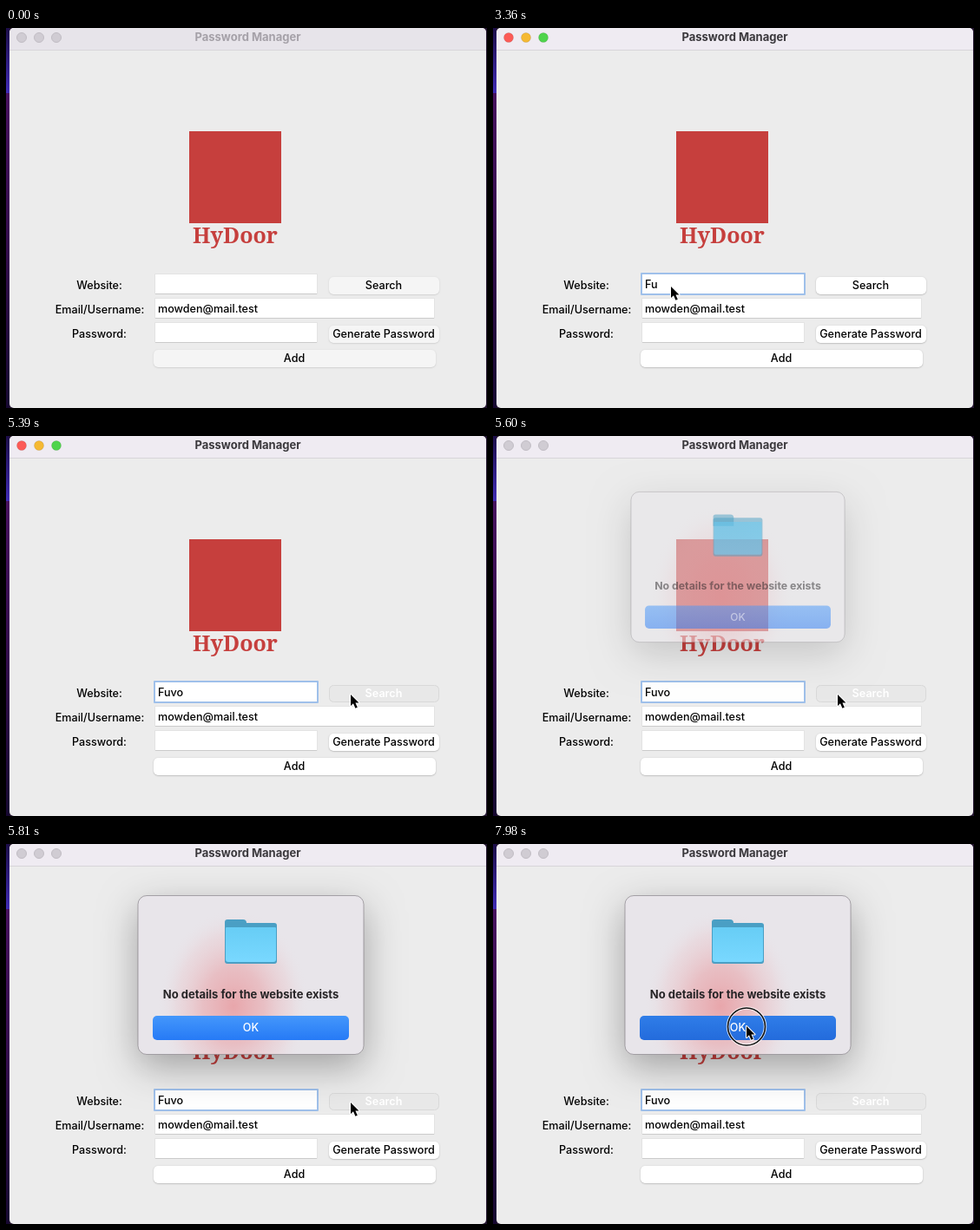
Recreate the animation shown at these times as an HTML page with a canvas. Size 554 px wide and 438 px high, loop 8 s.

```html
<!DOCTYPE html>
<html lang="en">
<head>
<meta charset="utf-8">
<title>Password Manager</title>
<style>
html, body { margin: 0; width: 100%; height: 100%; overflow: hidden; background: #ececec; }
canvas { display: block; }
</style>
</head>
<body>
<canvas id="stage" width="554" height="438"></canvas>
<script>
const ctx = document.getElementById('stage').getContext('2d');
const LOOP = 8000, TICK = 70;
const FOCUS = 1750, SEARCH = 5250, ALERT = 5390, CONFIRM = 7980;
const RING_TIME = 140;
const SITE = 'Fuvo', TYPED_AT = [2730, 3360, 3640, 3850];
const CARET_ON = [[1750, 2380], [2730, 3360], [3570, 4270], [4550, 5250]];

// Pointer tip: time, x, y
const POINTER = [
  [910, 262, 430], [1050, 246, 380], [1190, 230, 338], [1330, 216, 312],
  [1400, 212, 306], [1540, 208, 302], [1680, 205, 298], [4340, 205, 298],
  [4410, 214, 303], [4550, 290, 321], [4620, 337, 321], [4690, 368, 311],
  [4830, 392, 302], [4970, 397, 298], [7350, 397, 298], [7420, 388, 287],
  [7560, 325, 208], [7700, 295, 176], [7840, 291, 201], [7910, 292, 210],
];

function box(x, y, w, h, radius, fill, stroke) {
  ctx.beginPath();
  ctx.roundRect(x, y, w, h, radius);
  if (fill) { ctx.fillStyle = fill; ctx.fill(); }
  if (stroke) { ctx.strokeStyle = stroke; ctx.lineWidth = 1; ctx.stroke(); }
}

function label(text, x, y, { color = '#000', weight = 500, align = 'center', size = 12.6, family = 'Inter, sans-serif' } = {}) {
  ctx.font = `${weight} ${size}px ${family}`;
  ctx.textAlign = align;
  ctx.fillStyle = color;
  ctx.fillText(text, x, y);
}

function vertical(y0, y1, ...colors) {
  const g = ctx.createLinearGradient(0, y0, 0, y1);
  colors.forEach((c, i) => g.addColorStop(i / (colors.length - 1), c));
  return g;
}

function shadow(color, blur, dy) {
  ctx.shadowColor = color;
  ctx.shadowBlur = blur;
  ctx.shadowOffsetY = dy;
}

function pointerAt(t) {
  const i = POINTER.findIndex(p => p[0] > t);
  if (i < 0) return POINTER.at(-1).slice(1);
  const [t0, x0, y0] = POINTER[i - 1], [t1, x1, y1] = POINTER[i];
  const k = (t - t0) / (t1 - t0);
  return [x0 + (x1 - x0) * k, y0 + (y1 - y0) * k];
}

function drawWindow(t) {
  const active = t >= FOCUS;
  box(0, 0, 554, 438, 0, '#22142e');
  box(0, 0, 4, 75, 0, vertical(0, 75, '#1c0d48', '#3f2bb4'));
  box(0, 75, 4, 363, 0, vertical(75, 438, '#47105e', '#330b4c', '#160730'));
  box(4, 0, 549, 438, 5, '#ececec');
  box(4, 0, 549, 25, [5, 5, 0, 0], active ? '#efebf2' : '#e7e4ea');
  box(4, 25, 549, 1, 0, '#d8d5da');
  const lit = active && t < ALERT + TICK;
  ['#fc5b57', '#f5b933', '#4fd44c'].forEach((color, i) => {
    box(12.5 + 20 * i, 5.5, 11, 11, 5.5, lit ? color : '#d0ccd3', lit ? 'rgba(0,0,0,.1)' : '#c1bdc4');
  });
  label('Password Manager', 278.5, 15, { weight: 700, size: 13, color: active ? '#3a383c' : '#a5a1a8' });
}

function drawLogo() {
  box(211, 119, 106, 106, 0, '#c63f3d');
  label('HyDoor', 264, 248, { weight: 700, size: 25, family: '"Noto Serif", serif', color: '#c63f3d' });
}

function drawField(x, y, w, focused) {
  if (focused) box(x - 2, y - 2, w + 4, 26, 1, '#9fc0ea');
  box(x, y, w, 22, 0, '#fff');
  if (!focused) {
    box(x - .5, y - .5, w + 1, 23, 0, null, '#e3e3e3');
    box(x, y + 22, w, 1, 0, '#cbcbcb');
  }
}

function drawButton(text, x, y, w, active, pressed) {
  ctx.save();
  if (!pressed) shadow(active ? 'rgba(0,0,0,.3)' : 'rgba(0,0,0,.18)', 1.5, .5);
  box(x, y, w, 20, 5, pressed ? '#e8e8e8' : active ? '#fff' : '#f5f5f5');
  ctx.restore();
  if (pressed) box(x + .5, y + .5, w - 1, 19, 5, null, '#d9d9d9');
  label(text, x + w / 2 - .5, y + 14, pressed ? { color: '#fff', weight: 600 } : {});
}

function drawForm(t) {
  const active = t >= FOCUS;
  label('Website:', 107.5, 301);
  label('Email/Username:', 108, 329);
  label('Password:', 107.5, 357);
  drawField(172, 284, 186, active);
  drawField(172, 312, 321);
  drawField(172, 340, 186);
  label('mowden@mail.test', 175, 328, { align: 'left' });

  const typed = SITE.slice(0, TYPED_AT.filter(at => t >= at).length);
  label(typed, 175, 300, { align: 'left' });
  if (CARET_ON.some(([on, off]) => t >= on && t < off)) {
    box(Math.round(174.5 + ctx.measureText(typed).width), 287, 1, 16, 0, '#000');
  }
  drawButton('Search', 372, 287, 127, active, t >= SEARCH);
  drawButton('Generate Password', 372, 343, 127, active);
  drawButton('Add', 170, 371, 325, active);
}

function drawFolder() {
  box(252, 87, 25, 14, [3, 4, 0, 0], '#4a9fc4');
  box(252, 91, 60, 47, 3, '#4a9fc4');
  box(253, 96, 58, 40, [1, 1, 3, 3], vertical(96, 136, '#67cdf5', '#79d8ff'));
}

function drawAlert(t) {
  const p = Math.min(1, Math.max(0, (t - ALERT) / 420));
  if (!p) return;
  const ease = p * p * (3 - 2 * p), scale = .893 + .107 * ease;
  ctx.save();
  ctx.globalAlpha = ease;
  ctx.translate(282, 151);
  ctx.scale(scale, scale);
  ctx.translate(-282, -151);

  // Keep the shadow outside the panel, which is translucent while fading in
  ctx.save();
  const outside = new Path2D();
  outside.rect(0, -60, 600, 560);
  outside.roundRect(152, 59.5, 260, 183, 10);
  ctx.clip(outside, 'evenodd');
  shadow('rgba(0,0,0,.32)', 44, 14);
  box(152, 59.5, 260, 183, 10, '#e8e5ea');
  ctx.restore();
  box(152, 59.5, 260, 183, 10, '#e8e5ea');

  // Soft tint of the logo behind the translucent panel
  ctx.save();
  box(152, 59.5, 260, 183, 10);
  ctx.clip();
  ctx.translate(262, 187);
  ctx.scale(.78, 1);
  const glow = ctx.createRadialGradient(0, 0, 0, 0, 0, 112);
  glow.addColorStop(0, 'rgba(232,150,155,.8)');
  glow.addColorStop(.4, 'rgba(232,165,170,.6)');
  glow.addColorStop(.75, 'rgba(234,195,200,.32)');
  glow.addColorStop(1, 'rgba(232,229,234,0)');
  box(-160, -130, 360, 200, 0, glow);
  ctx.restore();

  box(152, 59.5, 260, 183, 10, null, 'rgba(110,105,112,.55)');
  drawFolder();
  label('No details for the website exists', 282, 178, { weight: 700, size: 13, color: '#262426' });
  const colors = t >= CONFIRM ? ['#2f7de8', '#236bdc'] : ['#4497fb', '#267af6'];
  box(169, 198, 226, 28, 5, vertical(198, 226, ...colors));
  label('OK', 282, 216, { color: '#fff' });
  ctx.restore();
}

function drawPointer(t) {
  if (t < POINTER[0][0]) return;
  const [x, y] = pointerAt(t);
  ctx.save();
  ctx.translate(x, y);
  if ([FOCUS, SEARCH, CONFIRM].some(at => t >= at && t < at + RING_TIME)) {
    ctx.beginPath();
    ctx.arc(0, .5, 21.5, 0, 7);
    for (const [color, width] of [['rgba(255,255,255,.75)', 3.5], ['#111', 1.6]]) {
      ctx.strokeStyle = color;
      ctx.lineWidth = width;
      ctx.stroke();
    }
  }
  const arrow = new Path2D('M0 0V13L3 10.2L5.4 15.8L7.8 14.8L5.4 9.4H9.5Z');
  ctx.lineJoin = 'round';
  ctx.lineWidth = 2;
  ctx.strokeStyle = '#fff';
  ctx.stroke(arrow);
  ctx.fillStyle = '#000';
  ctx.fill(arrow);
  ctx.restore();
}

function render(now) {
  const t = Math.floor(now % LOOP / TICK) * TICK;
  drawWindow(t);
  drawLogo();
  drawForm(t);
  drawAlert(t);
  drawPointer(t);
}

const start = performance.now();
function loop() {
  render(performance.now() - start);
  requestAnimationFrame(loop);
}
loop();
</script>
</body>
</html>
```
